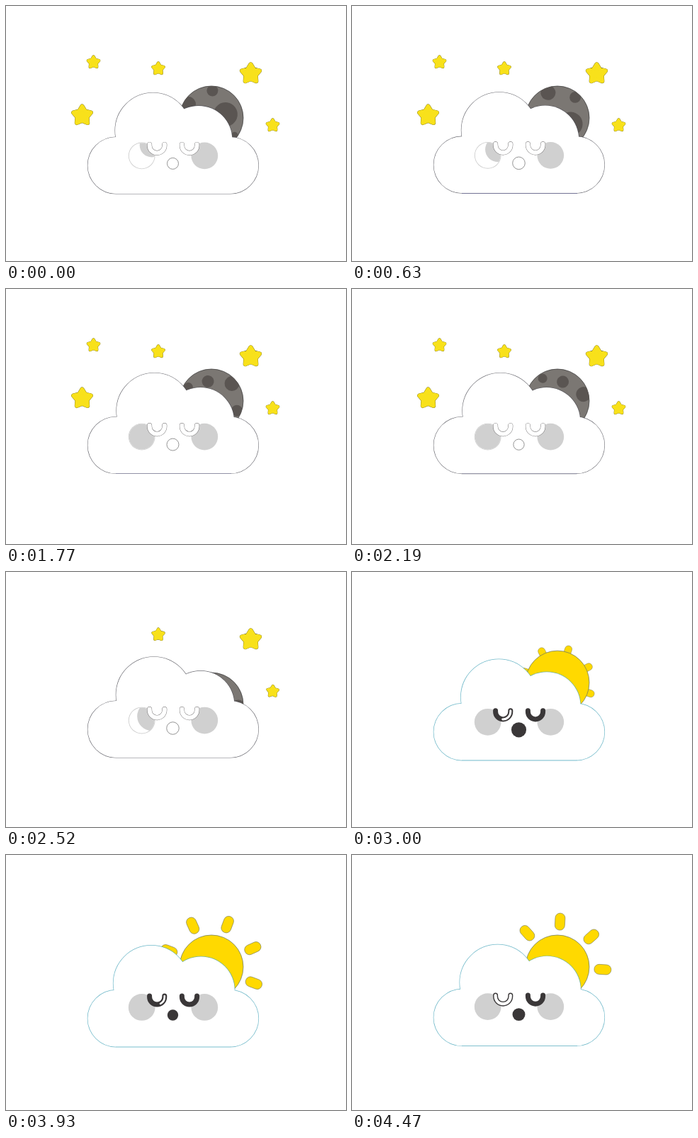
Animation of 480x360 px, one loop 4.5 s. Source, as an HTML page:

```html
<!DOCTYPE html>
<html lang="en">
<head>
<meta charset="utf-8">
<title>Sleepy cloud</title>
<style>
html, body { margin: 0; width: 100%; height: 100%; overflow: hidden; background: #fff; }
svg { display: block; width: 100vw; height: 100vh; }
</style>
</head>
<body>
<svg id="stage" viewBox="0 0 480 360"></svg>
<script>
const LOOP = 4500;
const DUSK_END = 2715;
const INK = '#3a3738';
const stage = document.getElementById('stage');

function add(parent, tag, attrs = {}) {
  const node = document.createElementNS('http://www.w3.org/2000/svg', tag);
  set(node, attrs);
  parent.appendChild(node);
  return node;
}
function set(node, attrs) {
  for (const k in attrs) node.setAttribute(k, attrs[k]);
}
const show = (node, on) => set(node, { display: on ? 'inline' : 'none' });
const clamp = x => Math.max(0, Math.min(1, x));
const part = (t, a, b) => clamp((t - a) / (b - a));
const easeInOut = x => (1 - Math.cos(Math.PI * x)) / 2;
const easeOutBack = x => 1 + 1.9 * (x - 1) ** 3 + 0.9 * (x - 1) ** 2;

// Smooth curve through [time, value] points.
function track(keys) {
  const slope = i => {
    const a = keys[Math.max(0, i - 1)], b = keys[Math.min(keys.length - 1, i + 1)];
    return (b[1] - a[1]) / (b[0] - a[0]);
  };
  return t => {
    let i = 0;
    while (i < keys.length - 2 && t > keys[i + 1][0]) i++;
    const [t0, v0] = keys[i], [t1, v1] = keys[i + 1];
    const d = t1 - t0, s = clamp((t - t0) / d), r = 1 - s;
    return v0 * (1 + 2 * s) * r * r + v1 * s * s * (3 - 2 * s)
      + slope(i) * d * s * r * r - slope(i + 1) * d * s * s * r;
  };
}

const baseY = track([[0, 265], [570, 264.3], [1200, 262.2], [1770, 260.5], [2050, 260.2],
  [2520, 262], [2700, 263.3], [3240, 267.6], [3450, 269.2], [3780, 270.4], [4050, 270.8], [4470, 269.4]]);
const lobeX = track([[0, 271.8], [1200, 273.5], [1770, 274.5], [4500, 275.4]]);
const blushR = track([[0, 17], [1200, 20.5], [1600, 34], [1800, 46], [2050, 46], [2520, 20.5], [2720, 46], [4500, 46]]);
const blushY = track([[0, -15], [1200, -4], [2520, -6], [4500, -6]]);
const glint = track([[0, .5], [3450, .5], [3930, .64], [4200, .4], [4470, 0]]);

// Stars: x, y, radius, time at which each starts to vanish.
const stars = [[107.5, 154.5, 15.5, 2300], [123.5, 79.5, 9.8, 2340], [215, 88.5, 9.8, 2500],
  [345.5, 95.5, 15.7, 2530], [376.5, 168.5, 9.8, 2480]].map(([x, y, r, out]) => {
  const pts = [];
  for (let i = 0; i < 10; i++) {
    const a = Math.PI * (i / 5 - .5), d = r * (i % 2 ? .47 : .83);
    pts.push((d * Math.cos(a)).toFixed(2) + ',' + (d * Math.sin(a)).toFixed(2));
  }
  const node = add(stage, 'g');
  const layer = (color, extra) => add(node, 'polygon', {
    points: pts.join(' '), fill: color, stroke: color,
    'stroke-width': r * .36 + extra, 'stroke-linejoin': 'round'
  });
  layer('#77701f', .7);
  layer('#f8e11b', 0);
  return { node, x, y, out };
});

const defs = add(stage, 'defs');
add(add(defs, 'clipPath', { id: 'disc' }), 'circle', { r: 45 });
add(add(defs, 'clipPath', { id: 'cheek' }), 'circle', { r: 18 });

// Moon: craters as angle, distance, radius.
const moon = add(stage, 'g');
add(moon, 'circle', { r: 45, fill: '#7b7773', stroke: '#333', 'stroke-width': .7 });
const craters = add(add(moon, 'g', { 'clip-path': 'url(#disc)' }), 'g');
for (const [a, d, r] of [[-149, 38, 10.5], [151, 28, 8.5], [-88, 38.5, 8], [-14, 20.5, 17], [102, 38, 6.5], [37, 41, 5]])
  add(craters, 'circle', { cx: d, r, fill: '#5a5552', transform: `rotate(${a})` });

const sun = add(stage, 'g');
const rays = add(sun, 'g');
for (let i = 0; i < 8; i++)
  add(rays, 'rect', {
    x: 52, y: -7, width: 24, height: 14, rx: 6.8, fill: '#ffd900',
    stroke: '#777b55', 'stroke-width': .6, transform: `rotate(${i * 45})`
  });
add(sun, 'circle', { r: 45, fill: '#ffd900', stroke: '#60716b', 'stroke-width': .7 });

// Cloud: outlines first, then the white shapes over them.
const cloud = add(stage, 'g');
const shapes = g => ({
  g,
  body: add(g, 'rect', { x: 115.4, width: 241, height: 80, rx: 40 }),
  left: add(g, 'circle', { r: 53.5 }),
  right: add(g, 'circle', { r: 47.5 })
});
const rim = shapes(add(cloud, 'g', { fill: 'none', 'stroke-width': 1.5, opacity: .8 }));
const fill = shapes(add(cloud, 'g', { fill: '#fff' }));
const baseLine = add(cloud, 'rect', { x: 155, width: 163, height: 1 });

const face = add(stage, 'g');
add(face, 'circle', { cx: 280.3, r: 18.9, fill: '#d0d0d0' });
const leftCheek = add(face, 'g', { transform: 'translate(191.7 0)' });
add(leftCheek, 'circle', { r: 18.9, fill: '#d0d0d0' });
const blush = add(leftCheek, 'g', { 'clip-path': 'url(#cheek)' });
add(blush, 'circle', { r: 18.5, fill: '#fff' });
const blushDisc = add(blush, 'circle', { cx: 14, fill: '#d0d0d0' });

const eyes = [213.2, 259].map(x => {
  const g = add(face, 'g', { transform: `translate(${x} -14.5)` });
  const arc = (stroke, width) => add(g, 'path', {
    d: 'M-10.6 -1.5V0A10.6 10.6 0 0 0 10.6 0V-1.5', fill: 'none', stroke,
    'stroke-width': width, 'stroke-linecap': 'round', pathLength: 1
  });
  return { dark: arc(INK, 7), light: arc('#fff', 6.2) };
});
const mouth = add(face, 'circle', { cx: 235.5, cy: 11 });

function draw(t) {
  const night = t < DUSK_END;
  const b = baseY(t), lift = b - 260.5;

  for (const s of stars) {
    const k = 1 - part(t, s.out, s.out + 170) ** 2;
    show(s.node, k > .02);
    set(s.node, { transform: `translate(${s.x} ${s.y}) rotate(${(1 - k) * 40}) scale(${k})` });
  }

  show(moon, night);
  set(moon, { transform: `translate(290 ${158 + 74 * easeInOut(part(t, 2340, 2760))})` });
  set(craters, { transform: `rotate(${t * .0615})` });

  show(sun, !night);
  set(sun, { transform: `translate(290 ${158 + 74 * (1 - easeOutBack(part(t, DUSK_END, 3180)))})` });
  const grow = .55 + .45 * easeInOut(part(t, 2850, 3210));
  set(rays, { transform: `rotate(${(t - 3450) * .051 - 3.8}) scale(${grow})` });

  const line = night ? '#4d4d55' : '#4fa9bd';
  set(rim.g, { stroke: line, 'stroke-width': night ? 1.2 : 1.4 });
  for (const s of [rim, fill]) {
    set(s.body, { y: b - 80 });
    set(s.left, { cx: 209.5 - .43 * lift, cy: 172 + .9 * lift });
    set(s.right, { cx: lobeX(t), cy: 186.5 + .43 * lift });
  }
  const frac = b - Math.floor(b);
  set(baseLine, {
    y: Math.floor(b), fill: night ? '#62628c' : '#4fa9bd',
    opacity: frac > .08 ? .9 * (1 - frac) : 0
  });

  set(face, { transform: `translate(0 ${208.6 + .62 * lift})` });
  show(blush, night);
  set(blushDisc, { cy: blushY(t), r: blushR(t) });

  const from = glint(t);
  eyes.forEach((eye, i) => {
    show(eye.light, night || i === 0);
    if (night) {
      set(eye.dark, { opacity: .8 });
      set(eye.light, { 'stroke-width': 6.2, 'stroke-dasharray': 'none' });
    } else {
      set(eye.dark, { opacity: 1 });
      set(eye.light, {
        'stroke-width': 4.2 - 1.6 * Math.min(1, from * 1.5),
        'stroke-dasharray': `${1 - from} 2`, 'stroke-dashoffset': -from
      });
    }
  });

  set(mouth, {
    r: 9.1 + 1.5 * Math.cos(2 * Math.PI * (t - 1170) / 1900),
    fill: night ? '#fff' : INK, stroke: night ? '#666' : 'none', 'stroke-width': .7
  });
}

function tick() {
  draw(performance.now() % LOOP);
  requestAnimationFrame(tick);
}
tick();
</script>
</body>
</html>
```
